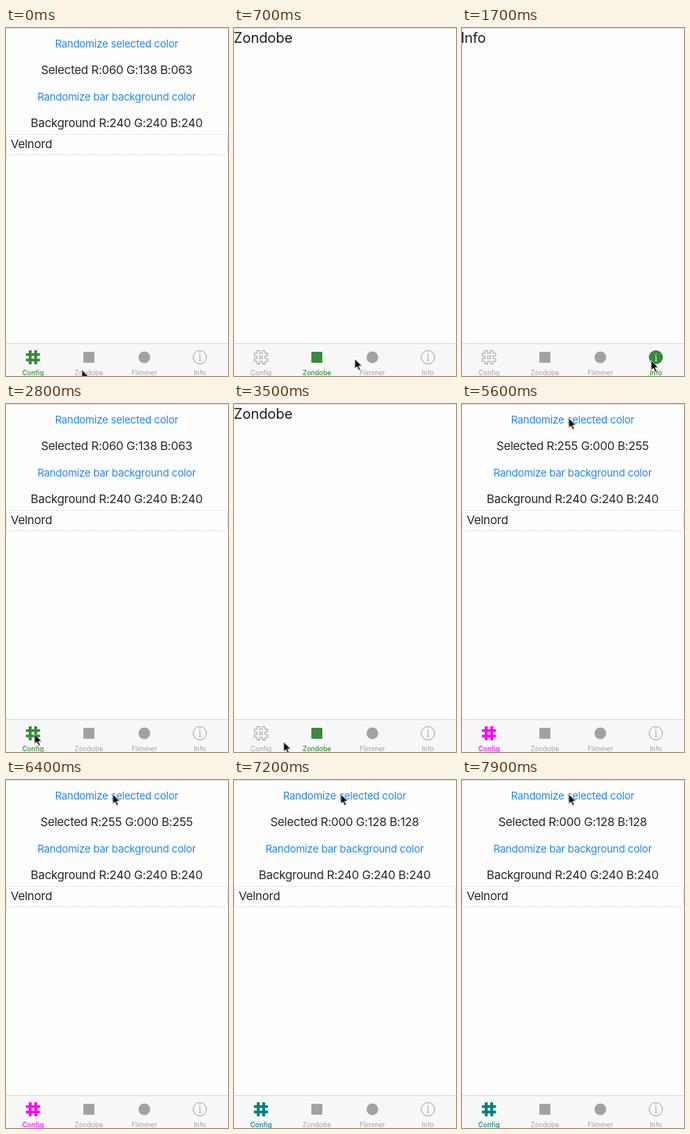
These frames come from a looping animation (284 by 446 pixels, 8000 ms). An HTML page:

```html
<!DOCTYPE html>
<html lang="en">
<head>
<meta charset="utf-8">
<title>Tab bar demo</title>
<style>
html, body { margin: 0; width: 100%; height: 100%; overflow: hidden; background: #fdfdfd; }
svg { display: block; width: 284px; height: 446px; font-family: Inter, "Liberation Sans", sans-serif; }

svg { animation: tabs 8s step-end infinite, accent 8s step-end infinite; }
.mid { text-anchor: middle; }
.link { font-size: 13.3px; letter-spacing: -.2px; fill: #2487ee; }
.body { font-size: 15.1px; letter-spacing: -.26px; fill: #262626; }
.title { font-size: 18px; letter-spacing: -.1px; fill: #1c1c1c; }
.label { font-size: 8.6px; }

/* Each tab and screen takes its visibility from one flag. */
.config { --on: var(--c); }
.video { --on: var(--v); }
.social { --on: var(--s); }
.info { --on: var(--i); }
.show { opacity: var(--on); }
.tab .on { opacity: var(--on); fill: var(--accent); }
.tab .off { opacity: calc(1 - var(--on)); fill: #a2a2a2; }
.on .label { font-weight: 500; }
.first { opacity: var(--r1); }
.second { opacity: var(--r2); }
.third { opacity: var(--r3); }
.line { fill: none; stroke: #a2a2a2; }
.hash { fill: none; stroke: var(--accent); stroke-width: 3.6; }

@keyframes tabs {
  0%, 31.25%, 49.375%, 100% { --c: 1; --v: 0; --s: 0; --i: 0; }
  3.75%, 40% { --c: 0; --v: 1; --s: 0; --i: 0; }
  11.25% { --c: 0; --v: 0; --s: 1; --i: 0; }
  18.75% { --c: 0; --v: 0; --s: 0; --i: 1; }
}
@keyframes accent {
  0%, 100% { --accent: #358a3b; --r1: 1; --r2: 0; --r3: 0; }
  70% { --accent: #ff00ff; --r1: 0; --r2: 1; --r3: 0; }
  88.75% { --accent: #008080; --r1: 0; --r2: 0; --r3: 1; }
}

.pointer { animation: point 8s ease-in-out infinite; }
@keyframes point {
  0% { transform: translate(97px, 438px); }
  3.75%, 5.625% { transform: translate(104px, 424px); }
  10.625%, 12.5% { transform: translate(175px, 424px); }
  18.125% { transform: translate(245px, 425px); }
  21.25%, 22.5% { transform: translate(242px, 426px); }
  30.625%, 35.625% { transform: translate(36.5px, 423px); }
  39.375%, 40.625% { transform: translate(103px, 424px); }
  43.75% { transform: translate(63.5px, 433px); }
  48.75%, 53.125% { transform: translate(36.5px, 424px); }
  61.25% { transform: translate(141.5px, 38px); }
  65.625%, 100% { transform: translate(136.5px, 18px); }
}
</style>
</head>
<body>
<svg viewBox="0 0 284 446">
  <rect width="284" height="446" fill="#fdfdfd"/>
  <path d="M0 .5H284" stroke="#dcdcdc"/>

  <g class="config"><g class="show">
    <g class="mid">
      <text class="link" x="141.5" y="24.5">Randomize selected color</text>
      <g class="body">
        <text class="first" x="141.5" y="59">Selected R:060 G:138 B:063</text>
        <text class="second" x="141.5" y="59">Selected R:255 G:000 B:255</text>
        <text class="third" x="141.5" y="59">Selected R:000 G:128 B:128</text>
      </g>
      <text class="link" x="141.5" y="92.5">Randomize bar background color</text>
      <text class="body" x="141.5" y="127">Background R:240 G:240 B:240</text>
    </g>
    <rect x=".5" y="136.5" width="283" height="26" rx="3" fill="none" stroke="#dcdcdc" stroke-dasharray="2 1"/>
    <text class="body" x="6" y="154.3">Velnord</text>
  </g></g>

  <g class="title">
    <g class="video"><text class="show" x="-.5" y="18.5">Zondobe</text></g>
    <g class="social"><text class="show" x="-.5" y="18.5">Flimmer</text></g>
    <g class="info"><text class="show" x="-1.5" y="18.5">Info</text></g>
  </g>

  <rect y="404" width="284" height="42" fill="#f7f7f7"/>
  <path d="M0 404.5H284" stroke="#d9d9d9"/>

  <g class="mid">
    <g class="tab config" transform="translate(34.5 422)">
      <g class="off">
        <path class="line" stroke-width="4.4" d="M-3.5-9V9M3.5-9V9M-9-3.5H9M-9 3.5H9"/>
        <path fill="none" stroke="#f7f7f7" stroke-width="2.6" d="M-3.5-8.1V8.1M3.5-8.1V8.1M-8.1-3.5H8.1M-8.1 3.5H8.1"/>
        <text class="label" y="23.2">Config</text>
      </g>
      <g class="on">
        <path class="hash" d="M-3.5-9V9M3.5-9V9M-9-3.5H9M-9 3.5H9"/>
        <text class="label" y="23.2">Config</text>
      </g>
    </g>

    <g class="tab video" transform="translate(106 422)">
      <g class="off">
        <rect x="-7" y="-7" width="14" height="14"/>
        <text class="label" y="23.2">Zondobe</text>
      </g>
      <g class="on">
        <rect x="-7" y="-7" width="14" height="14"/>
        <text class="label" y="23.2">Zondobe</text>
      </g>
    </g>

    <g class="tab social" transform="translate(177 422)">
      <g class="off">
        <circle r="7.5"/>
        <text class="label" y="23.2">Flimmer</text>
      </g>
      <g class="on">
        <circle r="7.5"/>
        <text class="label" y="23.2">Flimmer</text>
      </g>
    </g>

    <g class="tab info" transform="translate(248 422)">
      <g class="off">
        <circle class="line" r="8.5"/>
        <circle cy="-3.8" r=".9"/>
        <path class="line" d="M-1-1.2H.2V4.2M-1.2 4.2H1.4"/>
        <text class="label" y="23.2">Info</text>
      </g>
      <g class="on">
        <circle r="9"/>
        <circle cy="-3.8" r=".8" fill="#fff"/>
        <path d="M-.8-1.2H.2V4.2M-1 4.2H1.2" fill="none" stroke="#fff" stroke-width=".9"/>
        <text class="label" y="23.2">Info</text>
      </g>
    </g>
  </g>

  <g class="pointer">
    <path d="M0 0V12.6L2.9 10L5 14.8L7.2 13.8L5.1 9.2H9Z" fill="#111" stroke="#fff" stroke-width=".7"/>
  </g>
</svg>
</body>
</html>
```
